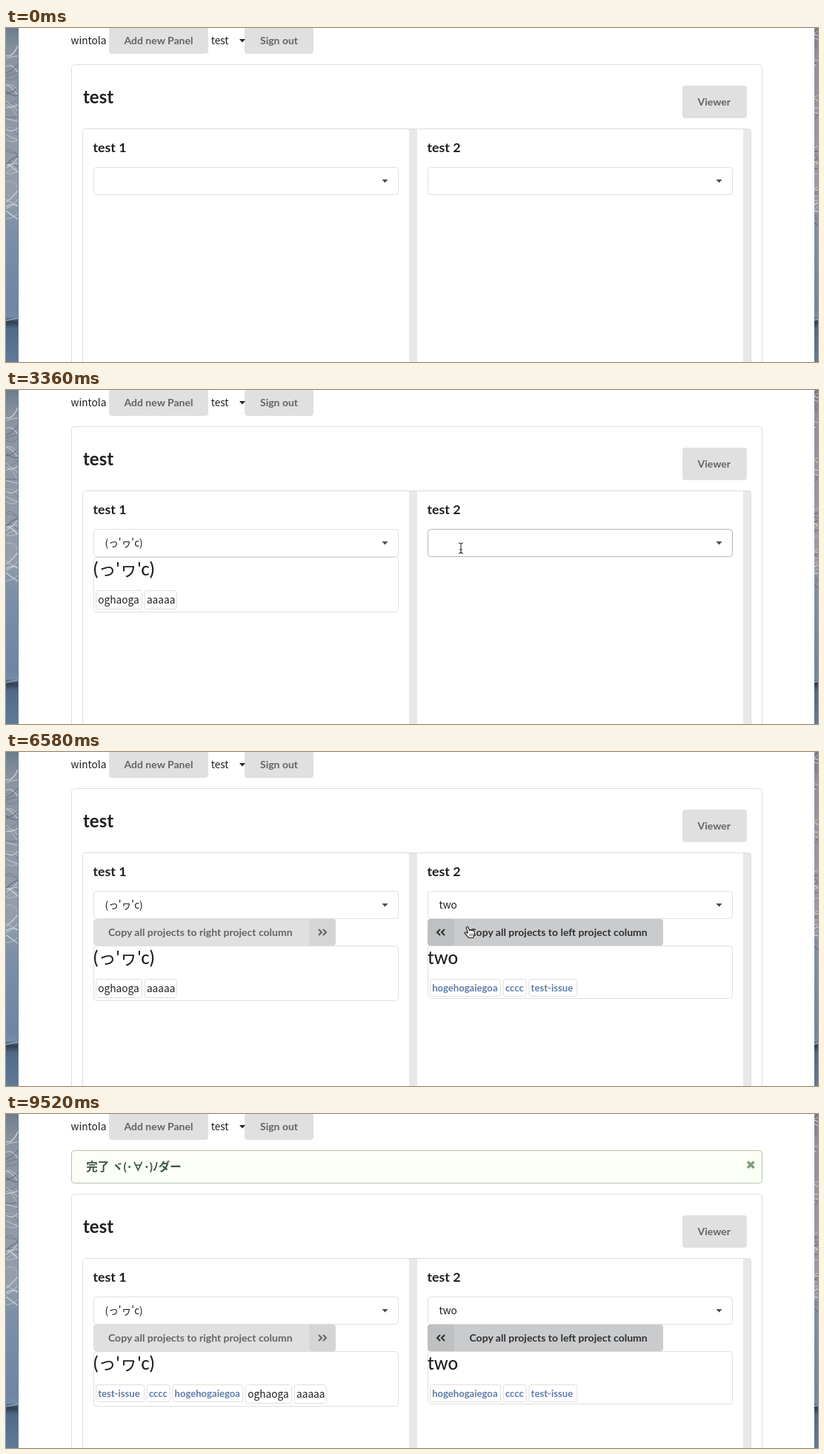
Animation of 1096 by 452 pixels, one loop 9.59 s. Source, as an HTML page:

```html
<!DOCTYPE html>
<html lang="ja">
<head>
<meta charset="utf-8">
<title>Panel columns</title>
<style>
html, body { margin: 0; width: 100%; height: 100%; overflow: hidden; background: #fff; }
svg { display: block; }
text { font: 300 13.7px "Noto Sans CJK JP", "Noto Sans", sans-serif; fill: #1f1f20; white-space: pre; }
.b { font: 700 14px Lato, "Noto Sans CJK JP", sans-serif; fill: #636465; }
.h2 { font: 700 24px Lato, sans-serif; }
.h3 { font: 700 17.8px Lato, sans-serif; }
.name { font: 500 24px Lato, "Noto Sans CJK JP", sans-serif; }
.link { font: 700 13.1px Lato, sans-serif; fill: #5f7ca6; }
.msg { font: 700 15.5px Lato, "Noto Sans CJK JP", sans-serif; fill: #395640; }
</style>
</head>
<body>
<svg id="stage" width="1096" height="452" viewBox="0 0 1096 452"></svg>
<script>
const LOOP = 9590, STEP = 70;
const LINE = '#dedede', FACE = "(っ'ヮ'c)";

// Times of the interface events
const OPEN1 = 2240, PICK1 = 2870, OPEN2 = 3430, PICK2 = 4060;
const HOVER = 6020, DONE = 6720, COPIED = 7770;

const path = [
  [1190, 470, 470], [1820, 440, 207], [2240, 440, 207], [2450, 414, 286], [3080, 414, 286],
  [3360, 614, 214], [3500, 614, 214], [3640, 611, 278], [5880, 611, 278], [6090, 625, 243],
  [6720, 625, 243], [6790, 622.5, 233], [8400, 622.5, 233], [8820, 660, 475]
];
const shapes = [
  [0, 'arrow'], [1750, 'beam'], [2310, 'hand'], [3080, 'arrow'], [3290, 'beam'],
  [3570, 'hand'], [4060, 'beam'], [5950, 'arrow'], [6020, 'hand'], [6790, 'arrow']
];

const clamp = v => Math.max(0, Math.min(1, v));
const between = (t, a, b) => t >= a && t < b;
const text = (x, y, s, cls = '', extra = '') => `<text x="${x}" y="${y}" class="${cls}" ${extra}>${s}</text>`;
const rect = (x, y, w, h, fill, r = 0) => `<rect x="${x}" y="${y}" width="${w}" height="${h}" fill="${fill}" rx="${r}"/>`;
const box = (x, y, w, h, line = LINE, fill = '#fff', r = 4) =>
  `<rect x="${x + .5}" y="${y + .5}" width="${w - 1}" height="${h - 1}" fill="${fill}" stroke="${line}" rx="${r}"/>`;
const caret = (x, y, c = '#4b4b4c') => `<path d="M${x - 4} ${y - 2}h8l-4 4.5z" fill="${c}"/>`;
const stroke = (d, c, w) => `<path d="${d}" fill="none" stroke="${c}" stroke-width="${w}"/>`;
const at = (x, y, s) => `<g transform="translate(${x} ${y})">${s}</g>`;

function backdrop() {
  let seed = 7;
  const rnd = n => (seed = seed * 16807 % 2147483647) / 2147483647 * n;
  const stops = [[0, '#6f7c8d'], [.08, '#8a94a1'], [.5, '#959fac'], [.6, '#7c90a9'], [.84, '#6c86a4'],
    [.865, '#748da8'], [.88, '#2f3f52'], [.9, '#4f6a87'], [1, '#5f7b98']];
  let s = '<defs><linearGradient id="ice" x1="0" y1="0" x2="0" y2="1">' +
    stops.map(([o, c]) => `<stop offset="${o}" stop-color="${c}"/>`).join('') +
    '</linearGradient></defs>' + rect(0, 0, 1096, 452, 'url(#ice)');
  for (const x of [0, 1088]) {
    for (let i = 0; i < 40; i++) {
      const y = rnd(265);
      const d = `M${x - 4} ${y}q${6 + rnd(10)} ${rnd(30) - 15} 24 ${rnd(44) - 22}`;
      s += stroke(d, i % 3 ? '#ccd3da' : '#66727f', .5 + rnd(.9));
    }
    s += stroke(`M${x} 396l18 -4`, '#a9bccd', 1.2);
  }
  return s + rect(16, 0, 1075, 452, '#6f7c8a') + rect(17, 0, 1074, 452, '#fff');
}

const button = (x, y, w, h, label, tx) => rect(x, y, w, h, '#e0e0e1', 4) + text(tx, y + h / 2 + 4.5, label, 'b');

const header = backdrop() + text(87.5, 22, 'wintola') + button(139, -1, 134, 36, 'Add new Panel', 159.5) +
  text(276.7, 22, 'test') + button(322, -1, 93, 36, 'Sign out', 343) + caret(319, 17, '#222');

const message = box(88, 49, 933, 45, '#b3c7a4', '#fcfff5') + text(108.3, 77, '完了 ヾ(･∀･)ﾉダー', 'msg') +
  stroke('M1001 64.5l8.5 8.5m0 -8.5l-8.5 8.5', '#819d7d', 3.4);

const board = box(88, 49, 933, 500) + text(104, 102, 'test', 'h2') +
  button(913, 78, 87, 44, 'Viewer', 933.5) + box(103, 136, 903, 420, '#dcdcdd', '#e8e8e8') +
  rect(104, 137, 440, 320, '#fff', 3) + rect(555, 137, 440, 320, '#fff') +
  text(117.5, 168, 'test 1', 'h3') + text(568.5, 168, 'test 2', 'h3');

function dropdown(x, value, open, hover) {
  return box(x, 188, 412, 38, open ? '#a4c6cf' : hover ? '#b4b4b5' : LINE) +
    text(x + 15.5, 212, value, '', open ? 'opacity=".5"' : '') + caret(x + 393.5, 207, open ? '#111' : '#4b4b4c');
}

function menu(x, items, active, grow) {
  const rows = rect(x + 1, 226, 410, 73, '#fff') + rect(x + 1, 226 + 37 * active, 410, 36, '#f2f2f2') +
    items.map((s, i) => text(x + 16.3, 249 + 37 * i, s)).join('');
  const edge = d => `M${x + .5} 224v${d}q0 4 4 4h403q4 0 4 -4v-${d}`;
  return `<g opacity="${grow}" transform="translate(0 ${226 * (1 - grow)}) scale(1 ${grow})">` +
    stroke(edge(73), '#e3e9ea', 3) + rows + stroke(edge(71.5), '#a4c6cf', 1) + '</g>';
}

function copyButton(x, w, label, left, hover) {
  const ix = left ? x : x + w - 36, dir = left ? -1 : 1, cx = ix + 18;
  const ink = hover ? '#2f3031' : '#636465';
  const angle = a => `M${a - 2 * dir} 240l${4 * dir} 4l${-4 * dir} 4`;
  return rect(x, 226, w, 36, hover ? '#cacbcc' : '#e0e0e1', 4) +
    rect(ix, 226, 36, 36, hover ? '#bfc0c1' : '#d5d5d6', 4) +
    text(x + (left ? 56.5 : 20), 248.5, label, 'b', `style="fill:${ink}"`) +
    stroke(angle(cx - 3) + angle(cx + 3), ink, 2.1);
}

const tagWidths = { 'test-issue': 66, cccc: 32, hogehogaiegoa: 96, oghaoga: 63, aaaaa: 44 };

function card(x, y, h, title, tags) {
  let tx = x + 3, s = box(x, y, 412, h) + text(x, y + 25, title, 'name');
  for (const name of tags) {
    const plain = name === 'oghaoga' || name === 'aaaaa';
    s += box(tx, y + 45, tagWidths[name], plain ? 26 : 24, LINE, '#fff', 3) +
      text(tx + 3.2, y + (plain ? 63 : 62), name, plain ? '' : 'link');
    tx += tagWidths[name] + 2.7;
  }
  return s;
}

const beam = 'M-3 -7q3 0 3 2v10q0 2 -3 2M3 -7q-3 0 -3 2v10q0 2 3 2M-2 2h4';
const cursors = {
  arrow: '<path d="M0 0v14.5l3.4 -3.2l2.3 5.4l2.6 -1.1l-2.3 -5.2h4.6z" fill="#111" stroke="#fff"/>',
  beam: stroke(beam, '#fff', 2.6) + stroke(beam, '#333', 1.1),
  hand: at(-7, -8, '<path d="M5.5 9.5L3.2 2.8Q4.3 .3 6 2.5L7.5 6.5Q8.7 4.8 10 6.5Q11.2 5.3 12.1 7Q13.8 6.5 14.4 8.5V12L12.7 16.5H6.7L1 10.2Q1.6 8.2 3.6 9.2L5.2 10.7" ' +
    'fill="#fff" stroke="#222" stroke-width="1.2"/>' + stroke('M8 10.5v3.5m2 -3.5v3.5m2 -3.5v3.5', '#444', .8))
};

function pointer(t) {
  const i = path.findIndex(p => p[0] > t);
  if (i < 1) return '';
  const [t0, x0, y0] = path[i - 1], [t1, x1, y1] = path[i];
  const k = (t - t0) / (t1 - t0), e = k * k * (3 - 2 * k);
  const shape = shapes.filter(s => s[0] <= t).pop()[1];
  return at(x0 + (x1 - x0) * e, y0 + (y1 - y0) * e, cursors[shape]);
}

// Menus slide open and shut
const slide = (t, a, b) => Math.min(clamp((t - a + STEP) / 210), clamp((b + 140 - t) / 210));

function scene(t) {
  const open1 = between(t, OPEN1, PICK1), open2 = between(t, OPEN2, PICK2);
  const both = t >= PICK2, cardY = both ? 262 : 226;
  let s = board + dropdown(118, t >= PICK1 ? FACE : open1 ? 'aaaa' : '', open1, between(t, 1750, OPEN1)) +
    dropdown(569, both ? 'two' : open2 ? 'one' : '', open2, between(t, 3290, 5950));
  if (both) {
    s += copyButton(118, 327, 'Copy all projects to right project column', false, false) +
      copyButton(569, 318, 'Copy all projects to left project column', true, t >= HOVER) +
      card(569, 262, 72, 'two', ['hogehogaiegoa', 'cccc', 'test-issue']);
  }
  if (t >= PICK1) {
    const added = t >= COPIED ? ['test-issue', 'cccc', 'hogehogaiegoa'] : [];
    s += card(118, cardY, 75, FACE, [...added, 'oghaoga', 'aaaaa']);
  }
  const grow1 = slide(t, OPEN1, PICK1), grow2 = slide(t, OPEN2, PICK2);
  if (grow1) s += menu(118, ['aaaa', FACE], t < 2380 ? 0 : 1, grow1);
  if (grow2) s += menu(569, ['one', 'two'], t < 3570 ? 0 : 1, grow2);
  const done = t >= DONE;
  return header + (done ? message : '') + at(0, done ? 59 : 0, s) + pointer(t);
}

const stage = document.getElementById('stage'), start = performance.now();
let shown = -1;
function tick() {
  const t = Math.floor((performance.now() - start) % LOOP / STEP) * STEP;
  if (t !== shown) stage.innerHTML = scene(shown = t);
  requestAnimationFrame(tick);
}
tick();
</script>
</body>
</html>
```
